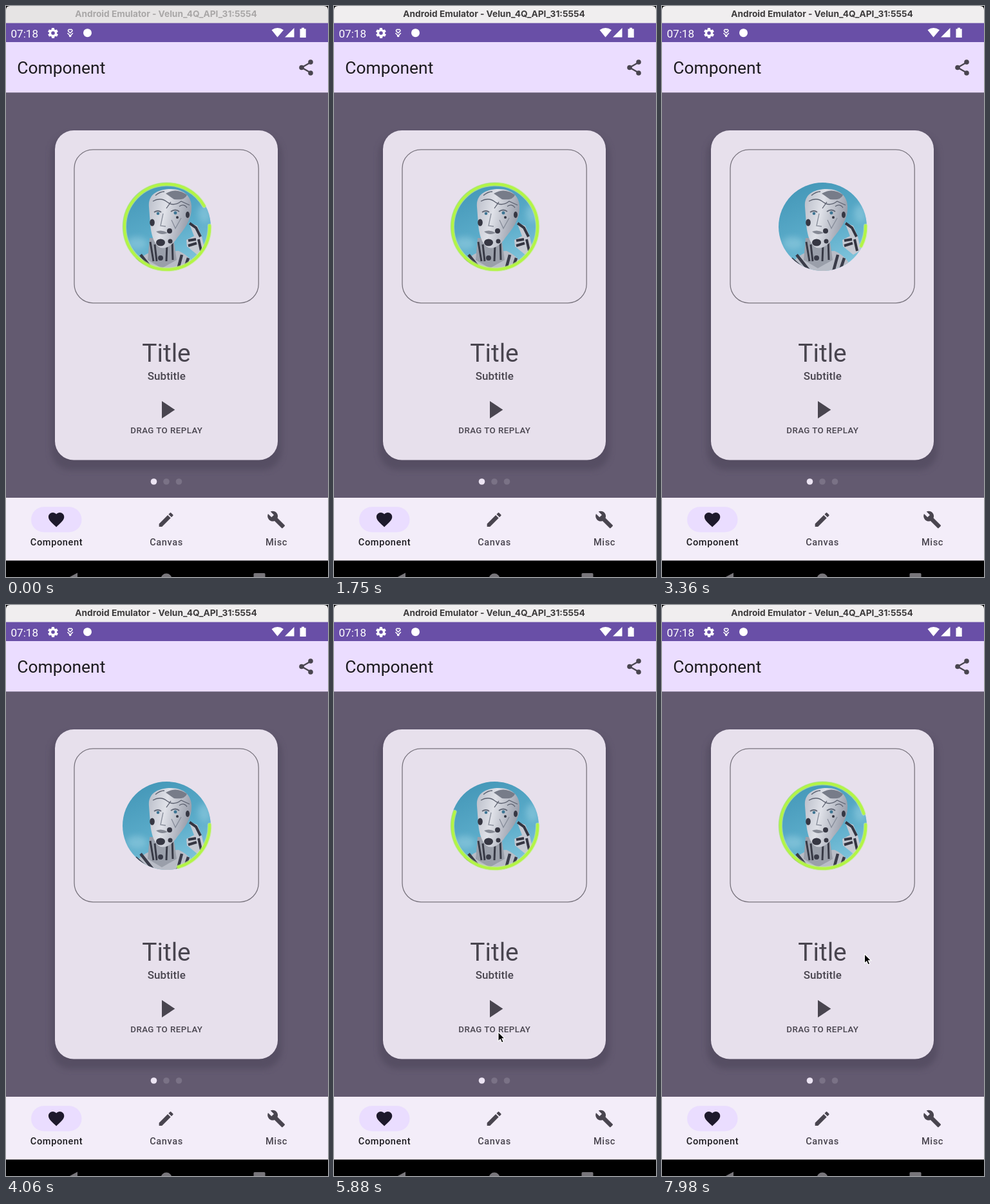
Animation of 500 by 886 pixels, one loop 8 s. Source, as an HTML page:

```html
<!DOCTYPE html>
<html lang="en">
<head>
<meta charset="utf-8">
<title>Component</title>
<style>
  html, body { margin: 0; width: 100%; height: 100%; overflow: hidden; background: #000; }
  svg { display: block; width: 100vw; height: 100vh; }
  text { font-family: Roboto, sans-serif; }
  .mid { text-anchor: middle; }
  .medium { font-weight: 500; }
  .label { font-size: 14.6px; letter-spacing: .6px; }
</style>
</head>
<body>
<svg viewBox="0 0 500 886" preserveAspectRatio="none">
  <defs>
    <clipPath id="avatarClip"><circle cx="249.5" cy="342.5" r="68.5"/></clipPath>
    <linearGradient id="sky" x1=".2" y1="0" x2=".6" y2="1">
      <stop offset="0" stop-color="#4396b7"/>
      <stop offset=".55" stop-color="#5aabc9"/>
      <stop offset="1" stop-color="#82c6dd"/>
    </linearGradient>
    <linearGradient id="shell" x1="0" y1="0" x2="1" y2=".3">
      <stop offset="0" stop-color="#b9bdc8"/>
      <stop offset=".45" stop-color="#dfe1e8"/>
      <stop offset="1" stop-color="#9a9fac"/>
    </linearGradient>
    <filter id="blur" x="-20%" y="-20%" width="140%" height="140%"><feGaussianBlur stdDeviation="5"/></filter>
  </defs>

  <!-- window title -->
  <path id="titleBar" d="M0 27V6Q0 0 6 0H494Q500 0 500 6V27Z"/>
  <text id="windowTitle" class="mid" x="248.5" y="17" style="font:700 13.7px Inter,sans-serif">Android Emulator - Velun_4Q_API_31:5554</text>

  <!-- status bar -->
  <rect y="26.5" width="500" height="30" fill="#694fa7"/>
  <g fill="#fff">
    <text x="7.5" y="48.5" font-size="17.1">07:18</text>
    <g transform="translate(63.4 32.4) scale(.8)">
      <path fill-rule="evenodd" d="M19.4 13c0-.3.1-.6.1-1s0-.7-.1-1l2.1-1.6c.2-.1.2-.4.1-.6l-2-3.5c-.1-.2-.4-.3-.6-.2l-2.5 1c-.5-.4-1.1-.7-1.7-1l-.4-2.6c0-.3-.2-.5-.5-.5h-4c-.2 0-.4.2-.5.4l-.4 2.7c-.6.2-1.1.6-1.7 1l-2.5-1c-.2-.1-.5 0-.6.2l-2 3.5c-.1.2-.1.5.1.6L4.6 11c0 .3-.1.7-.1 1s0 .7.1 1l-2.1 1.6c-.2.2-.2.4-.1.6l2 3.5c.1.2.4.3.6.2l2.5-1c.5.4 1.1.7 1.7 1l.4 2.7c0 .2.2.4.5.4h4c.2 0 .5-.2.5-.4l.4-2.7c.6-.2 1.1-.6 1.7-1l2.5 1c.2.1.5 0 .6-.2l2-3.5c.1-.2.1-.5-.1-.6zM12 15.5a3.5 3.5 0 1 1 0-7 3.5 3.5 0 0 1 0 7z"/>
    </g>
    <path d="M99.7 42l-3.2-3.2a2 2 0 0 1 3.2-2 2 2 0 0 1 3.2 2zM95.5 42l4.2 4.3 4.2-4.3" fill="none" stroke="#fff" stroke-width="1.5"/>
    <circle cx="99.7" cy="46.5" r="1.8"/>
    <circle cx="126.5" cy="41.7" r="6.5"/>
    <path d="M421.5 48.5L412.5 37.3Q421.5 30.5 431 37.3Z"/>
    <path d="M447.5 34V48.5H433Z"/>
    <path d="M456.5 35.5h2.5v-1.7h4v1.7h2.7v13.500h-9.2z"/>
  </g>

  <!-- app bar -->
  <rect y="56" width="500" height="79" fill="#ebddff"/>
  <text x="17.3" y="105.4" font-size="26.4" fill="#1c1b1f">Component</text>
  <g fill="#49454f" stroke="#49454f">
    <path d="M473 87.5L459 95.5L473 103.5" fill="none" stroke-width="2.3"/>
    <g stroke="none">
      <circle cx="473" cy="87" r="3.8"/><circle cx="459" cy="95.5" r="3.8"/><circle cx="473" cy="104" r="3.8"/>
    </g>
  </g>

  <!-- card -->
  <rect y="134.3" width="500" height="629" fill="#635a70"/>
  <rect x="70" y="200" width="358" height="520" rx="30" fill="#4a4256" opacity=".5" filter="url(#blur)"/>
  <rect x="76" y="193" width="346" height="511.5" rx="29.2" fill="#e7e0ec"/>
  <rect x="106" y="222.8" width="286.2" height="238" rx="29.2" fill="none" stroke="#79747e" stroke-width="1.3"/>

  <!-- avatar -->
  <g clip-path="url(#avatarClip)">
    <rect x="180" y="273" width="140" height="140" fill="url(#sky)"/>
    <g fill="#a3d6e6" opacity=".45" filter="url(#blur)">
      <ellipse cx="203" cy="368" rx="16" ry="10"/><ellipse cx="308" cy="322" rx="10" ry="14"/>
    </g>
    <path d="M196 412Q204 389 225 382L268 380Q290 390 296 412Z" fill="#b9bdc7"/>
    <path d="M201 392l20 18M209 386l19 24M273 386l-7 26M283 391l-7 21" stroke="#3a3c49" stroke-width="4.5"/>
    <path d="M223 360H260L265 394L242 407L220 394Z" fill="#9a9faa"/>
    <path d="M224 366l5 30M231 370l3 26M250 370l-1 26M258 362l1 32" stroke="#383a46" stroke-width="3"/>
    <circle cx="240" cy="391" r="4" fill="#3a3c49"/>
    <path d="M222 312C220 291 238 284 256 284C279 284 289 298 288 314C288 333 276 347 265 361C257 373 248 377 240 375C230 371 225 354 224 338Z" fill="url(#shell)"/>
    <path d="M248 291Q264 281 281 293Q278 302 261 300Z" fill="#777c89"/>
    <path d="M228 303Q240 296 250 304T272 303L285 309M249 314L256 304M269 311q7-5 12 2M232 294q7-6 14-6" fill="none" stroke="#5c616f" stroke-width="1.3"/>
    <path d="M230 320q6-4 11 0M256 319q7-5 13 0" fill="none" stroke="#626876" stroke-width="2"/>
    <g fill="#3f7694"><circle cx="236" cy="322" r="2.3"/><circle cx="263" cy="321" r="2.5"/></g>
    <path d="M244 322l-4 19 8 1M257 332l6 13 9-16" fill="none" stroke="#868c99" stroke-width="1.3"/>
    <path d="M233 350q9-4 18 2q-10 5-18-2" fill="#858994"/>
    <g fill="#363743">
      <ellipse cx="227" cy="336" rx="3.8" ry="5.5"/><ellipse cx="282" cy="324" rx="3" ry="5"/>
      <circle cx="254" cy="349" r="4"/><ellipse cx="240" cy="367" rx="7" ry="5.500"/>
      <circle cx="266" cy="328" r="2"/><circle cx="255" cy="365" r="3.5"/>
    </g>
    <path d="M284 336L297 341L304 358L309 379L297 386L281 373L280 363L292 357Z" fill="#c5c9d2"/>
    <path d="M285 337l10 7 7 14M283 364l12-2M283 372l13-4M299 362l4 18" fill="none" stroke="#343541" stroke-width="4"/>
  </g>
  <g fill="none" stroke-linecap="round" transform="rotate(-1.5 250 342.7)">
    <circle class="ring" cx="250" cy="342.7" r="66.2" pathLength="360" stroke="#c9ee98" stroke-opacity=".65" stroke-width="6.5"/>
    <circle class="ring" cx="250" cy="342.7" r="66.2" pathLength="360" stroke="#b3f545" stroke-width="4.2"/>
  </g>

  <g fill="#49454f" class="mid">
    <text x="249" y="552" font-size="38.9">Title</text>
    <text x="249.3" y="580" class="medium" font-size="17" letter-spacing=".1">Subtitle</text>
    <g id="replay">
      <path d="M242 613L262.3 626.5L242 640Z"/>
      <text x="249.3" y="663" class="medium" font-size="13.3" letter-spacing=".45">DRAG TO REPLAY</text>
    </g>
  </g>

  <g fill="#7a7286">
    <circle cx="229.5" cy="738" r="4.8" fill="#ece4f3"/>
    <circle cx="249" cy="738" r="4.8"/><circle cx="268.5" cy="738" r="4.8"/>
  </g>

  <!-- bottom tabs -->
  <rect y="763" width="500" height="98" fill="#f3edf9"/>
  <rect x="39" y="777.3" width="78.5" height="39.2" rx="19.6" fill="#eaddff"/>
  <g fill="#49454f">
    <path transform="translate(63.5 782.4) scale(1.217)" fill="#1d192b" d="M12 21.35l-1.45-1.32C5.4 15.36 2 12.28 2 8.5 2 5.42 4.42 3 7.5 3c1.74 0 3.41.81 4.5 2.09C13.09 3.81 14.76 3 16.5 3 19.58 3 22 5.42 22 8.5c0 3.78-3.4 6.86-8.55 11.54z"/>
    <path transform="translate(234 782.4) scale(1.217)" d="M3 17.25V21h3.75L17.81 9.94l-3.75-3.75zM20.71 7.04a1 1 0 0 0 0-1.41l-2.34-2.34a1 1 0 0 0-1.41 0l-1.83 1.83 3.75 3.75z"/>
    <path transform="translate(405 782.4) scale(1.217)" d="M22.7 19l-9.1-9.1c.9-2.3.4-5-1.5-6.9-2-2-5-2.4-7.4-1.3L9 6 6 9 1.6 4.7C.4 7.1.9 10.1 2.9 12.1c1.9 1.9 4.6 2.4 6.9 1.5l9.1 9.1c.4.4 1 .4 1.4 0l2.3-2.3c.5-.4.5-1.1.1-1.4z"/>
    <g class="mid medium label">
      <text x="78.5" y="837" fill="#1c1b1f">Component</text>
      <text x="249" y="837">Canvas</text>
      <text x="420" y="837">Misc</text>
    </g>
  </g>

  <!-- system navigation -->
  <rect y="860.5" width="500" height="25.5" fill="#000"/>
  <g fill="#77757a">
    <path d="M111 879.5V893L97 887Z"/>
    <circle cx="249" cy="889" r="8.5"/>
    <rect x="384.5" y="880" width="18" height="18" rx="1.5"/>
  </g>

  <path id="cursor" d="M0 0V14.3L3.3 11.3L5.6 16.6L8.2 15.5L5.9 10.3H10.3Z" fill="#000" stroke="#fff" stroke-width="1.1"/>
</svg>
<script>
  const LOOP = 8000, STEP = 70;
  const DEGREES_PER_MS = 0.0685, RESTART = 2950;
  const $ = id => document.getElementById(id);
  const rings = document.querySelectorAll('.ring');
  const cursorStops = [
    { from: 3710, to: 3920, x: 213, y: 737 },
    { from: 4760, to: 6440, x: 255, y: 662.5 },
    { from: 7280, to: LOOP, x: 314.5, y: 541.5 }
  ];
  const clamp = v => Math.max(0, Math.min(1, v));
  const smooth = v => v * v * (3 - 2 * v);

  function sweepAt(t) {
    const angle = t < RESTART - 10 ? 332 + t * DEGREES_PER_MS : (t - RESTART) * DEGREES_PER_MS;
    return Math.max(0, Math.min(360, angle));
  }

  function dragAt(t) {
    const pull = smooth(clamp((t - 2590) / 280));
    const release = 1 - clamp((t - 2900) / 380);
    return 21.5 * pull * release * release;
  }

  function draw(time) {
    const t = Math.floor((time % LOOP) / STEP) * STEP;

    const active = t >= 1750;
    $('titleBar').setAttribute('fill', active ? '#f0eeef' : '#e6e4e4');
    $('windowTitle').setAttribute('fill', active ? '#3d3b3c' : '#a9a7a7');

    const sweep = sweepAt(t);
    for (const ring of rings) {
      ring.setAttribute('stroke-dasharray', sweep < 360 ? `${sweep} 720` : 'none');
      ring.setAttribute('visibility', sweep > 0 ? 'visible' : 'hidden');
    }

    $('replay').setAttribute('transform', `translate(0 ${dragAt(t)})`);

    const stop = cursorStops.find(s => t >= s.from && t < s.to);
    $('cursor').setAttribute('visibility', stop ? 'visible' : 'hidden');
    if (stop) $('cursor').setAttribute('transform', `translate(${stop.x} ${stop.y})`);
  }

  const start = performance.now();
  function tick() {
    draw(performance.now() - start);
    requestAnimationFrame(tick);
  }
  tick();
</script>
</body>
</html>
```
